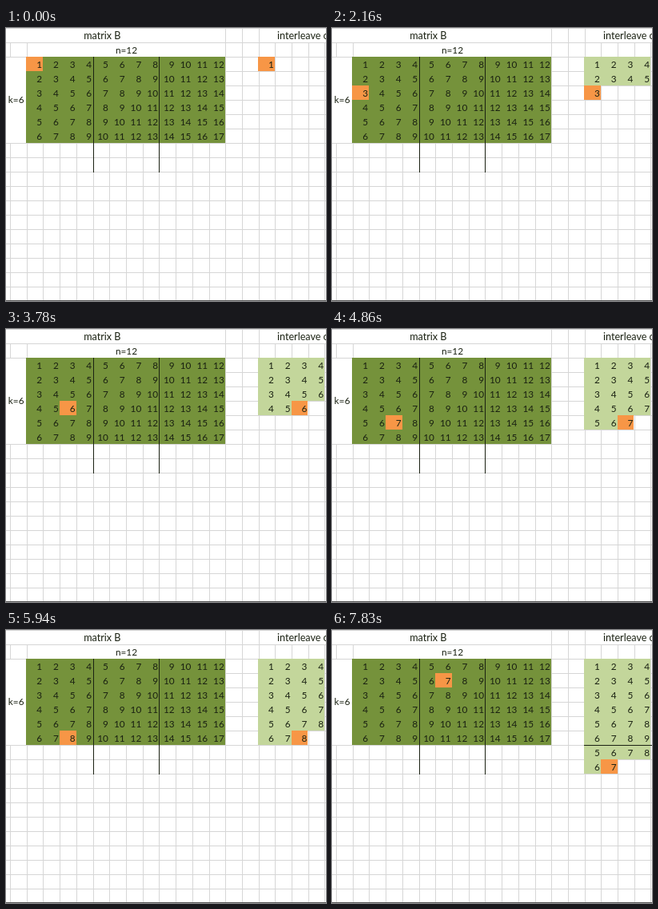
An HTML page with a canvas that plays this animation: 400x342 px, repeating every 8 s.

```html
<!DOCTYPE html>
<html lang="en">
<head>
<meta charset="utf-8">
<title>Matrix interleave</title>
<style>
  html, body { margin: 0; width: 100%; height: 100%; overflow: hidden; background: #fff; }
  canvas { display: block; width: 100vw; height: 100vh; }
</style>
</head>
<body>
<canvas id="stage" width="400" height="342"></canvas>
<script>
const ctx = document.getElementById('stage').getContext('2d');
const W = 400, H = 342;
const LOOP = 8000, STEP = 270;
const COL = 20.7, ROW = 18;
const LEFT = 25.4, RIGHT = LEFT + 14 * COL, TOP = 36;
const ROWS = 6, COLS = 12, BLOCK = 4;
const GREEN = '#75923b', PALE = '#c3d69b', ORANGE = '#f79646';
const GRID = '#d6d6d6', INK = '#1a2112';

function rect(x0, y0, x1, y1, color) {
  ctx.fillStyle = color;
  x0 = Math.round(x0);
  y0 = Math.round(y0);
  ctx.fillRect(x0, y0, Math.round(x1) - x0, Math.round(y1) - y0);
}

function hline(y, x0, x1, color) { rect(x0, y, x1, y + 1, color); }

// vertical line on the left border of a sheet column
function vline(col, y0, y1, color) {
  const x = Math.round(LEFT + col * COL + 0.4);
  rect(x, y0, x + 1, y1, color);
}

function label(text, x, y, align, size = 11.8) {
  ctx.font = `${size}px Lato, Carlito, sans-serif`;
  ctx.fillStyle = INK;
  ctx.textAlign = align;
  ctx.fillText(text, x, y);
}

function cell(left, row, col, color) {
  const x = left + col * COL, y = TOP + row * ROW;
  rect(x, y, x + COL, y + ROW, color);
}

function number(left, row, col, value) {
  label(value, left + (col + 1) * COL - 1, TOP + row * ROW + 14, 'right');
}

function drawSheet() {
  rect(0, 0, W, H, '#fff');
  for (let y = 0; y < H; y += ROW) hline(y, 0, W, GRID);
  for (let i = -1; i < 19; i++) vline(i, 0, H, GRID);

  // merged header cells
  rect(0, 1, 274, 18, '#fff');
  rect(27, 19, 274, 36, '#fff');
  rect(0, 37, 26, 144, '#fff');
  rect(317, 1, W, 18, '#fff');
  hline(341, 0, W, '#555');

  label('matrix B', 120.3, 13.5, 'center', 12.6);
  label('n=12', 150.5, 31.5, 'center');
  label('k=6', 12.7, 94, 'center');
  label('interleave of B', 339, 13.5, 'left', 12.6);
}

function drawMatrix(row, col) {
  rect(LEFT, TOP, LEFT + COLS * COL, TOP + ROWS * ROW, GREEN);
  cell(LEFT, row, col, ORANGE);
  for (let r = 0; r < ROWS; r++)
    for (let c = 0; c < COLS; c++) number(LEFT, r, c, r + c + 1);
  for (let c = BLOCK; c < COLS; c += BLOCK) vline(c, TOP, 181, INK);
}

function drawOutput(step) {
  for (let i = 0; i <= step; i++) {
    const row = Math.floor(i / BLOCK), col = i % BLOCK;
    const band = Math.floor(row / ROWS);
    cell(RIGHT, row, col, i === step ? ORANGE : PALE);
    number(RIGHT, row, col, row % ROWS + band * BLOCK + col + 1);
  }
  if (step >= ROWS * BLOCK) hline(TOP + ROWS * ROW, RIGHT, W, INK);
}

function draw(now) {
  const step = Math.floor(now % LOOP / STEP);
  const line = Math.floor(step / BLOCK);
  const band = Math.floor(line / ROWS);
  drawSheet();
  drawMatrix(line % ROWS, band * BLOCK + step % BLOCK);
  drawOutput(step);
}

const start = performance.now();
function tick() {
  draw(performance.now() - start);
  requestAnimationFrame(tick);
}
tick();
</script>
</body>
</html>
```
